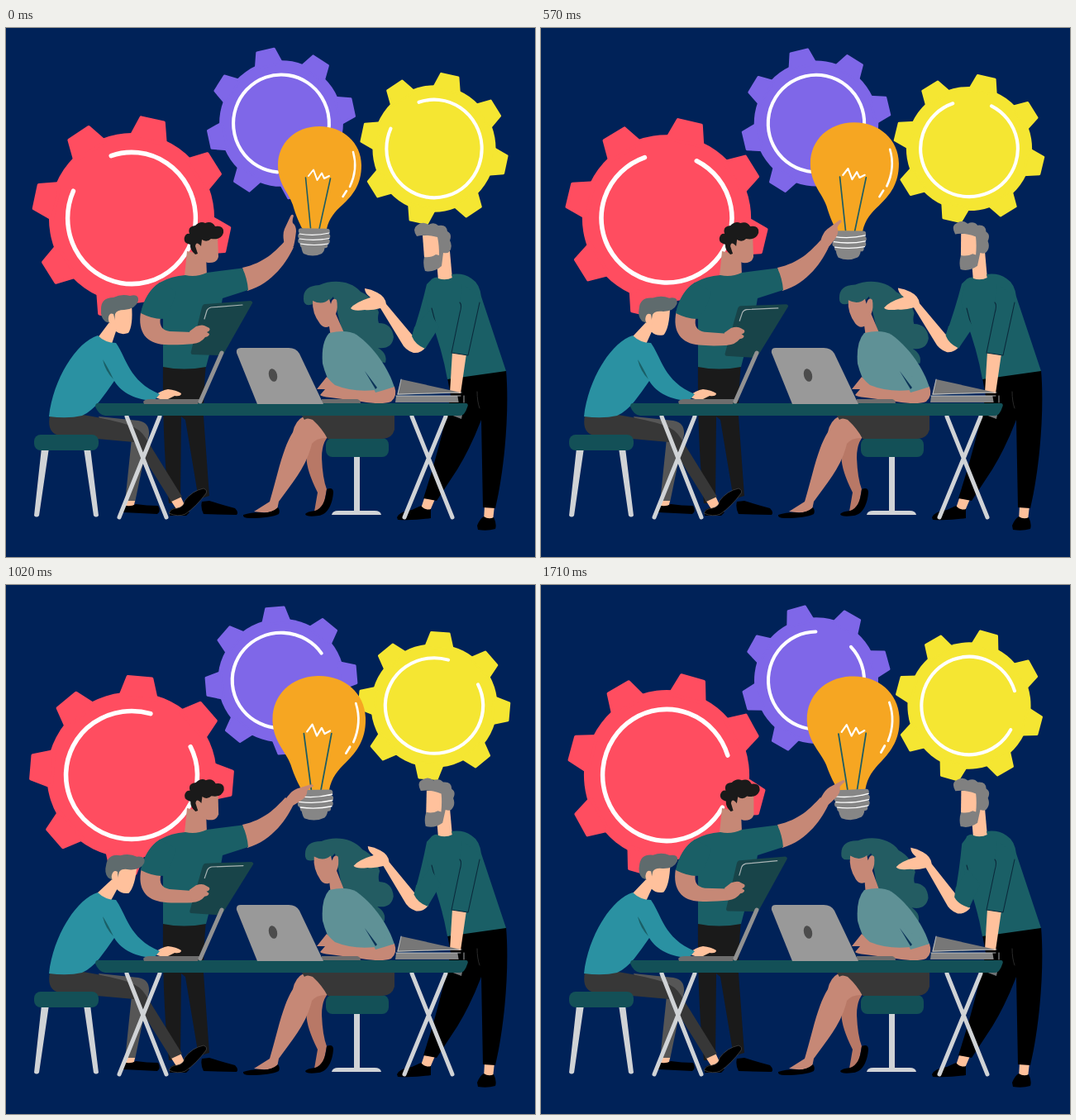
Write an HTML page that moves like this. It is 640 by 640 pixels and loops after 1.74 s.

```html
<!DOCTYPE html>
<html lang="en">
<head>
<meta charset="utf-8">
<title>Team at work</title>
<style>
  html, body { margin: 0; width: 100%; height: 100%; overflow: hidden; background: #002258; }
  svg { display: block; width: 100vw; height: 100vh; }
  .teal { fill: #1a5f66; }
  .deep { fill: #135057; }
  .sea { fill: #2a91a2; }
  .tan { fill: #c68876; }
  .shade { fill: #b87866; }
  .peach { fill: #ffc19c; }
  .black { fill: #000; }
  .ink { fill: #1a1a1a; }
  .coal { fill: #373737; }
  .grey { fill: #868686; }
  .line { fill: none; stroke-linecap: round; stroke-linejoin: round; }
  .legs { stroke: #d0d3d6; stroke-width: 5; }
  .seam { stroke: #0b2a3c; stroke-width: 1.1; }
  .white { stroke: #fff; }
</style>
</head>
<body>
<svg viewBox="0 0 640 640">
  <g id="gears"></g>

  <g id="bulb">
    <path fill="#f6a622" d="M379 119C350 119 329 139 329 166C329 189 342 199 347 214C351 228 355 236 358 242Q372 253 388 243C391 230 398 222 407 214C420 202 430 189 430 166C430 139 408 119 379 119Z"/>
    <g class="line">
      <path stroke="#1d5c63" stroke-width="1.6" d="M362.5 181L368.500 242M392.500 182L379 243"/>
      <path class="white" stroke-width="2" d="M366 179L372 171.500L376.500 184L382 175.500L385 182L391 179"/>
      <path class="white" stroke-width="2.5" d="M420 150Q426 171 416 192M412 197L407.500 204"/>
    </g>
    <path class="grey" d="M357 260L386 261Q386 270 382 273Q371 278 360 273Q357 269 357 260Z"/>
    <g class="line" stroke="#868686" stroke-width="6.5">
      <path d="M357 245.500L388.500 246M356.500 251.500L389 252M356.500 257.500L388.500 258M359 262.500L386 263"/>
    </g>
    <path class="line white" stroke-width="1.2" d="M355 249Q373 252 391 248M355 255Q373 258 391 254.500M356 261Q373 264 390 261"/>
  </g>

  <!-- standing man, left -->
  <g>
    <path class="ink" d="M190 405L242 405Q239 440 239 470L246 566L233 570L217 474L212 470L211 575L197 575Q189 500 190 405Z"/>
    <path class="black" d="M237 573L246 572Q262 577 277 581Q282 586 279 589L239 588Q235 580 237 573ZM199 583Q210 575 222 586L218 590H198Z"/>
    <path class="tan" d="M286 290C313 284 326 270 338 257L348 265C341 281 323 309 292 318Z"/>
    <path class="tan" d="M219 270L242 275L243 299Q230 304 216 300Z"/>
    <path class="teal" d="M217 299Q230 302 243 296L286 290.500Q292 303 293 317L262 327L258 350L242 410Q215 415 190 410L190 352L163 345Q170 318 186 308Q200 300 217 299Z"/>
    <g id="headA">
      <path class="tan" d="M230 250L256 252L257 277Q255 285 244 284L226 277Z"/>
      <path class="ink" d="M229 274Q222 268 223 262Q214 260 216 253Q218 248 222 249Q219 240 229 239Q235 233 241 236Q249 233 253 240Q264 238 263 248Q260 257 248 255Q243 260 237 256L236 264Q230 257 229 264L232 273Z"/>
    </g>
    <g id="tablet">
      <path class="tan" d="M163 344L187 350Q184 365 198 367L225 368L229 382Q205 384 192 383C170 382 159 368 163 344Z"/>
      <path fill="#184449" d="M241 334L296 330Q299 331 298 333L264 393Q262 396 258 396L225 395Q223 394 224 391L237 338Q238 334 241 334Z"/>
      <path class="line" stroke="#a9b4b5" stroke-width="1.2" d="M240 352L243 342Q244 339 248 338L286 335"/>
      <path class="tan" d="M222 367L230 361Q238 358 242 361L246 363Q248 366 243 368L246 370Q246 373 241 374Q236 381 226 382Z"/>
    </g>
    <path class="teal" d="M186 308Q168 320 163 345Q177 352 188 352Q203 340 205 318Z"/>
  </g>
  <path id="point" class="tan" d="M337 262Q334 250 337 243L344 228Q346 224 348 227Q346 233 347 236Q351 239 351 246Q350 256 348 264Q342 269 337 262Z"/>

  <!-- standing man, right -->
  <g>
    <path class="peach" d="M507 566L519 570L513 584L502 581ZM579 578L591 578L589 596L578 596Z"/>
    <path class="black" d="M473 592Q476 585 491 583L502 578Q507 584 514 582L514 593Q495 596 474 595ZM570 602Q573 594 578 591Q584 595 590 592Q594 600 592 606Q582 609 571 607Z"/>
    <path class="black" d="M534 423L605 414C609 460 604 530 592 581L577 580L575 474Q562 508 546 534L521 572L505 569C516 535 529 490 538 445Z"/>
    <path class="line" stroke="#2a2a2a" d="M570 440Q570 452 573 460"/>
    <path id="upper" class="teal" d="M515 304Q528 297 538 310L530 345L507 388Q496 386 491 373Q502 340 509 310Z"/>
    <path class="peach" d="M520 270L537 270L540 304L523 306Z"/>
    <path class="teal" d="M515 304Q521 300 523 303Q532 306 540 302L539 298Q553 296 563 303Q573 309 575 325L605 415L534 425Q528 390 513 350L508 330Z"/>
    <path class="peach" d="M540 392L557 394L550 442L537 441Z"/>
    <path class="teal" d="M552 310L574 325L559 396L539 393Z"/>
    <path class="line seam" d="M515 339L521 362M549 332Q552 335 549 345L539 393L559 396L573 332"/>
    <g id="headD">
      <path class="peach" d="M504 251L526 248L534 285L520 287L506 278Z"/>
      <path fill="#808080" d="M497 252Q491 243 497 239Q504 233 511 238Q518 234 523 239Q533 237 534 246Q540 249 537 257Q541 265 536 271Q534 273 529 272L527 288Q518 296 507 294Q504 286 506 277Q514 278 520 274L524 275Q524 262 522 253Q508 249 497 252Z"/>
    </g>
  </g>

  <!-- books -->
  <path fill="#777" d="M478 425L550 441L473 444Z"/>
  <path fill="#858585" d="M472 445H548V453H471Z"/>
  <path class="black" d="M546 443L557 442L556 455H548Z"/>
  <path class="line" stroke="#d0d3d6" stroke-width=".8" d="M478 425L474 443L551 441M472 445H550M554 445V453"/>
  <path fill="#6e7274" d="M538 468L552 468L551 473Z"/>

  <!-- seated woman -->
  <g>
    <path fill="#d0d3d6" d="M421 516H428V585H421ZM394 589Q395 584 402 584H446Q453 584 454 589Z"/>
    <rect class="deep" x="387" y="496" width="76" height="23" rx="8"/>
    <path class="shade" d="M390 494Q382 502 382 520Q383 545 388 558L383 585H373L377 562Q361 530 364 514L372 490Z"/>
    <path class="tan" d="M360 470L374 472L390 496Q376 495 370 503C364 530 346 551 330 573L328 583Q318 588 300 585L319 573C329 540 334 510 347 489Q350 475 360 470Z"/>
    <path class="black" d="M287 589Q296 586 307 586Q320 588 329 580Q332 584 330 588Q320 593 295 593Q286 593 287 589ZM388 558Q396 555 396 562C395 576 389 589 378 590Q363 592 362 588Q364 585 374 584Q386 580 388 558Z"/>
    <path class="coal" d="M358 469H470V486Q467 497 455 497H389Q383 485 371 474Q364 471 361 474Z"/>
    <g id="headC">
      <path fill="#235c62" d="M360 328Q359 312 379 311C394 304 417 305 429 319Q445 326 451 344Q449 352 451 357Q467 357 469 374Q467 389 450 387Q462 394 459 405L453 404C436 390 430 370 408 372L396 325Q386 338 372 334Q360 338 360 328Z"/>
      <path class="tan" d="M371 330Q383 336 391 328L393 334Q395 325 400 329Q402 338 399 346L410 371L393 374L391 361Q385 364 380 358Q370 345 371 330Z"/>
    </g>
    <path fill="#5f9196" d="M391 369Q412 364 424 371C445 386 463 412 470 435Q454 444 435 447L396 437Q387 422 383 406Q381 380 391 369Z"/>
    <path class="tan" d="M376 437L388 422Q393 428 398 432Q420 441 447 438L470 434Q474 445 466 452Q455 456 430 452L392 447Q382 446 380 444L386 437Z"/>
    <path fill="#5f9196" d="M434 412L470 434Q458 438 447 441Z"/>
    <path fill="#0b3358" d="M434 415L449 435L447 437Z"/>
  </g>

  <g id="fore" class="peach">
    <path d="M417 339Q422 332 441 326Q434 321 434 315Q442 316 449 320Q459 325 460 334L491 371L508 386Q502 394 493 393Q483 390 478 380L453 339Q442 342 434 341Q420 343 417 339Z"/>
  </g>
  <path id="cuff" class="teal" d="M494 362L512 342L524 362L507 388Q495 383 491 373Z"/>

  <!-- seated man -->
  <g>
    <path fill="#d0d3d6" d="M43 508H52L40 590Q37 593 34 590ZM94 508H102L112 590Q109 593 106 590Z"/>
    <path fill="#565656" d="M112 470L160 475Q174 477 173 492L156 574H144L152 497L120 490Z"/>
    <path class="peach" d="M145 572H156L154 582H144ZM199 571L211 566L216 577L206 582Z"/>
    <path class="black" d="M142 577Q150 580 157 576Q170 578 184 578Q188 585 183 588L142 586Z"/>
    <path class="coal" d="M53 469L93 468Q130 474 150 481Q162 485 169 496L213 567L200 573L155 501L65 493Q49 490 53 469Z"/>
    <path class="black" stroke="#555" stroke-width=".6" d="M197 587Q200 581 207 581Q215 580 216 572Q225 560 239 557Q244 559 242 563Q230 579 217 588Q208 592 197 587Z"/>
    <rect class="deep" x="34" y="492" width="78" height="19" rx="8"/>
    <path class="peach" d="M178 446Q188 438 196 437Q206 438 212 442Q212 446 204 445L192 451Z"/>
    <g id="headB" class="peach">
      <path d="M124 336L152 335Q154 360 148 369Q139 372 133 367L127 385L110 376L125 356Z"/>
      <path fill="#5f6b6d" d="M115 340Q115 326 130 326Q140 321 150 324Q161 321 160 330Q157 340 143 341Q134 341 132 346L131 357Q124 357 120 355Q114 350 115 340Z"/>
      <path d="M124 350Q125 344 130 346L133 358L127 358Q123 355 124 350Z"/>
    </g>
    <path class="sea" d="M111 372Q120 381 133 381C146 399 148 427 186 443L179 451C158 450 140 442 131 427C118 445 108 462 92 469Q75 473 52 470C57 425 85 380 111 372Z"/>
    <path class="teal" d="M117 401Q123 410 130 425Q120 415 117 401Z"/>
  </g>

  <!-- table and laptops -->
  <g class="line legs"><path d="M146 470L194 592M186 470L137 592M491 470L540 592M532 470L482 592"/></g>
  <path class="deep" d="M110 454H557Q560 455 558 459Q555 469 549 469H120Q112 468 108 458Q108 455 110 454Z"/>
  <path fill="#6d6d6d" d="M166 452Q168 449 174 449H234L232 455H167Z"/>
  <path class="line" stroke="#929292" stroke-width="5" d="M261 393L235 452"/>
  <path fill="#6d6d6d" d="M382 449H425Q429 450 429 454H382Z"/>
  <path fill="#999" d="M284 387H342Q351 387 355 394L384 455H304L279 393Q278 387 284 387Z"/>
  <ellipse cx="323" cy="420" rx="5" ry="8" fill="#4c4c4c" transform="rotate(-14 323 420)"/>
</svg>

<script>
const LOOP = 1740, STEP = 30, SPIN = 0.0808;
const TIMES = [0, 240, 570, 870, 1170, 1440, 1710];

// Values at TIMES
const scale = [1, 1.03, 1.06, 1.1, 1.125, 1.135, 1.108];
const tilt = [0, 0, -0.5, -1.4, -2.3, -2.8, -3.6];
const arm = [0, 1.2, 1.3, -0.9, -3.8, -6.5, -8];
const joints = [
  ["point", 341, 262, [0, 9, 28, 41, 53, 51, 37]],
  ["headA", 232, 290, [0, 0, 0.2, 0.6, 1, 1.2, 2]],
  ["headB", 127, 375, [0, 2.5, 6, 9.5, 9.7, 9, 6.5]],
  ["headC", 405, 370, [0, 0.3, 1.2, 2, 3, 4, 4.3]],
  ["headD", 530, 300, [0, 2.7, 4.8, 5.5, 5.5, 5.3, 5]],
  ["tablet", 175, 360, [0, 1, 2, 2.8, 1.6, 0.3, -0.7]],
  ["upper", 530, 310, arm],
  ["cuff", 530, 310, arm]
];
const gears = [
  { x: 152, y: 230, k: 1, fill: "#ff4d60", dir: 1, turn: 12.3, gap: -168, lag: 0 },
  { x: 333, y: 115.5, k: 0.745, fill: "#7f67e8", dir: -1, turn: -12.4, gap: 60, lag: 230 },
  { x: 518, y: 146, k: 0.745, fill: "#f5e632", dir: 1, turn: 12.3, gap: -168, lag: 0 }
];

const $ = id => document.getElementById(id);
const set = (el, transform) => el.setAttribute("transform", transform);
const polar = (r, deg) => {
  const a = deg * Math.PI / 180;
  return (r * Math.cos(a)).toFixed(2) + " " + (r * Math.sin(a)).toFixed(2);
};

function gearMarkup({ fill, gap }) {
  let teeth = "";
  for (let a = -90; a < 270; a += 45) {
    teeth += `M${polar(97, a - 13)}L${polar(120.5, a - 6.8)}L${polar(120.5, a + 6.8)}L${polar(97, a + 13)}Z`;
  }
  return `<g><g fill="${fill}"><circle r="101.5"/>` +
    `<path d="${teeth}" stroke="${fill}" stroke-width="4" stroke-linejoin="round"/></g>` +
    `<path class="line white" stroke-width="5.5" d="M${polar(78.5, gap + 47)}A78.5 78.5 0 1 1 ${polar(78.5, gap)}"/></g>`;
}

// Smooth curve through the values of a track
function at(track, t) {
  const last = TIMES.length - 1;
  let i = 0;
  while (i < last - 1 && t > TIMES[i + 1]) i++;
  const slope = j => {
    const a = Math.max(j - 1, 0), b = Math.min(j + 1, last);
    return (track[b] - track[a]) / (TIMES[b] - TIMES[a]);
  };
  const h = TIMES[i + 1] - TIMES[i], u = (t - TIMES[i]) / h, v = 1 - u;
  return v * v * ((1 + 2 * u) * track[i] + u * h * slope(i)) +
    u * u * ((1 + 2 * v) * track[i + 1] - v * h * slope(i + 1));
}

$("gears").innerHTML = gears.map(gearMarkup).join("");
gears.forEach((g, i) => g.el = $("gears").children[i]);

function draw(t) {
  for (const g of gears) {
    const squash = 0.014 * Math.cos(2 * Math.PI * (t - g.lag) / LOOP);
    set(g.el, `translate(${g.x} ${g.y}) scale(${g.k * (1 - squash)} ${g.k * (1 + squash)}) rotate(${g.turn + g.dir * SPIN * t})`);
  }
  set($("bulb"), `translate(376 197) rotate(${at(tilt, t)}) scale(${at(scale, t)}) translate(-376 -197)`);
  for (const [id, x, y, track] of joints) set($(id), `rotate(${at(track, t)} ${x} ${y})`);

  // The forearm rides on the elbow
  const deg = at(arm, t), a = deg * Math.PI / 180;
  const ex = -37 * Math.cos(a) - 78 * Math.sin(a) + 37;
  const ey = -37 * Math.sin(a) + 78 * Math.cos(a) - 78;
  set($("fore"), `translate(${ex} ${ey}) rotate(${-0.2 * deg} 493 388)`);
}

const start = performance.now();
function tick() {
  const t = (performance.now() - start) % LOOP;
  draw(Math.floor(t / STEP) * STEP);
  requestAnimationFrame(tick);
}
draw(0);
tick();
</script>
</body>
</html>
```
